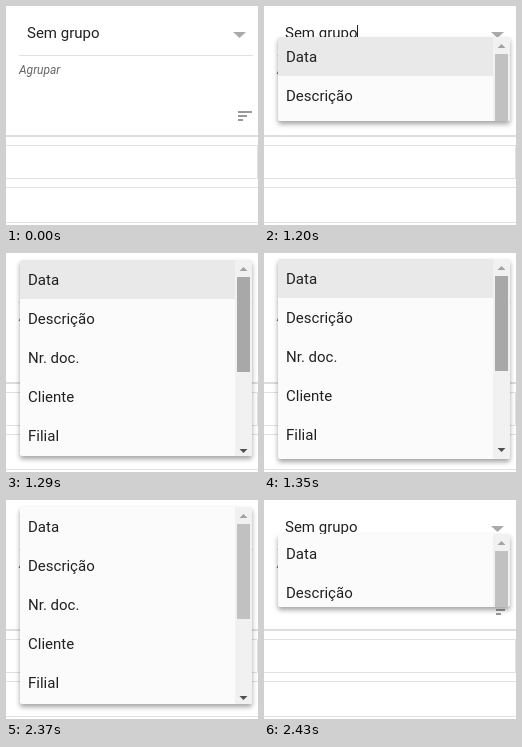
Recreate the animation shown at these times as an HTML page. Size 252 by 219 pixels, loop 2.46 s.

```html
<!DOCTYPE html>
<html lang="pt">
<head>
<meta charset="utf-8">
<style>
  html, body { margin: 0; height: 100%; overflow: hidden; background: #fff; }
  body { position: relative; font: 15px Roboto, sans-serif; color: #212121; }
  svg { position: absolute; left: 0; top: 0; }
  #panel {
    position: absolute; left: 14px; width: 232px; overflow: hidden;
    background: #fbfbfb; border-radius: 2px; box-shadow: 0 3px 5px rgba(0, 0, 0, .36);
  }
  #panel div { height: 39px; line-height: 41px; padding-left: 8px; }
  #panel svg { left: 215px; }
</style>
</head>
<body>
<svg width="252" height="219">
  <text x="21" y="32" fill="#212121">Sem grupo</text>
  <path id="caret" d="M93.5 19v18" stroke="#222"/>
  <path d="M227 26h13l-6.5 6z" fill="#aaa"/>
  <path d="M13 49.5h234" stroke="#e0e0e0"/>
  <text x="13" y="68" font-size="12" font-style="italic" fill="#666">Agrupar</text>
  <path d="M232 106h14M232 110h9M232 114h5" stroke="#999" stroke-width="2"/>
  <path d="M0 130h252" stroke="#ddd" stroke-width="2"/>
  <path d="M0 139.5h251.5v33H0M0 181.5h252M0 216.5h252" fill="none" stroke="#e0e0e0"/>
</svg>
<div id="panel">
  <div id="first">Data</div>
  <div>Descrição</div>
  <div>Nr. doc.</div>
  <div>Cliente</div>
  <div>Filial</div>
  <svg width="17" height="200">
    <path d="M0 0h17v200H0z" fill="#f1f1f1"/>
    <path d="M4.5 11h8l-4-4z" fill="#a3a3a3"/>
    <path d="M4.5 189h8l-4 4z" fill="#505050"/>
    <path id="thumb" d="M2 17h13v95H2z"/>
  </svg>
</div>
<script>
const $ = id => document.getElementById(id);
const panel = $('panel'), first = $('first'), thumb = $('thumb'), caret = $('caret');
const LOOP = 2460, STEP = 30, OPEN = 1170, CLOSE = 2370;

// Cubic Bézier ease (.25, .1, .25, 1), solved by bisection
function ease(x) {
  if (x <= 0) return 0;
  if (x >= 1) return 1;
  let lo = 0, hi = 1, u;
  for (let i = 0; i < 24; i++) {
    u = (lo + hi) / 2;
    if (.75 * u * (1 - u) + u ** 3 < x) lo = u; else hi = u;
  }
  return .3 * u * (1 - u) ** 2 + 3 * u * u * (1 - u) + u ** 3;
}

function draw() {
  const t = Math.floor(performance.now() % LOOP / STEP) * STEP;
  const p = t < CLOSE ? ease((t - 1159) / 160) : 1 - ease((t - 2365) / 176);
  panel.style.display = t < OPEN ? 'none' : 'block';
  panel.style.top = Math.round(49.4 - 43.4 * p) + 'px';
  panel.style.height = Math.round(200 * p) + 'px';
  first.style.background = t < CLOSE ? '#e9e9e9' : 'none';
  thumb.style.fill = t >= 1260 && t < 1680 ? '#a8a8a8' : '#c1c1c1';
  caret.style.display = t >= OPEN && t < CLOSE ? '' : 'none';
  requestAnimationFrame(draw);
}
draw();
</script>
</body>
</html>
```
